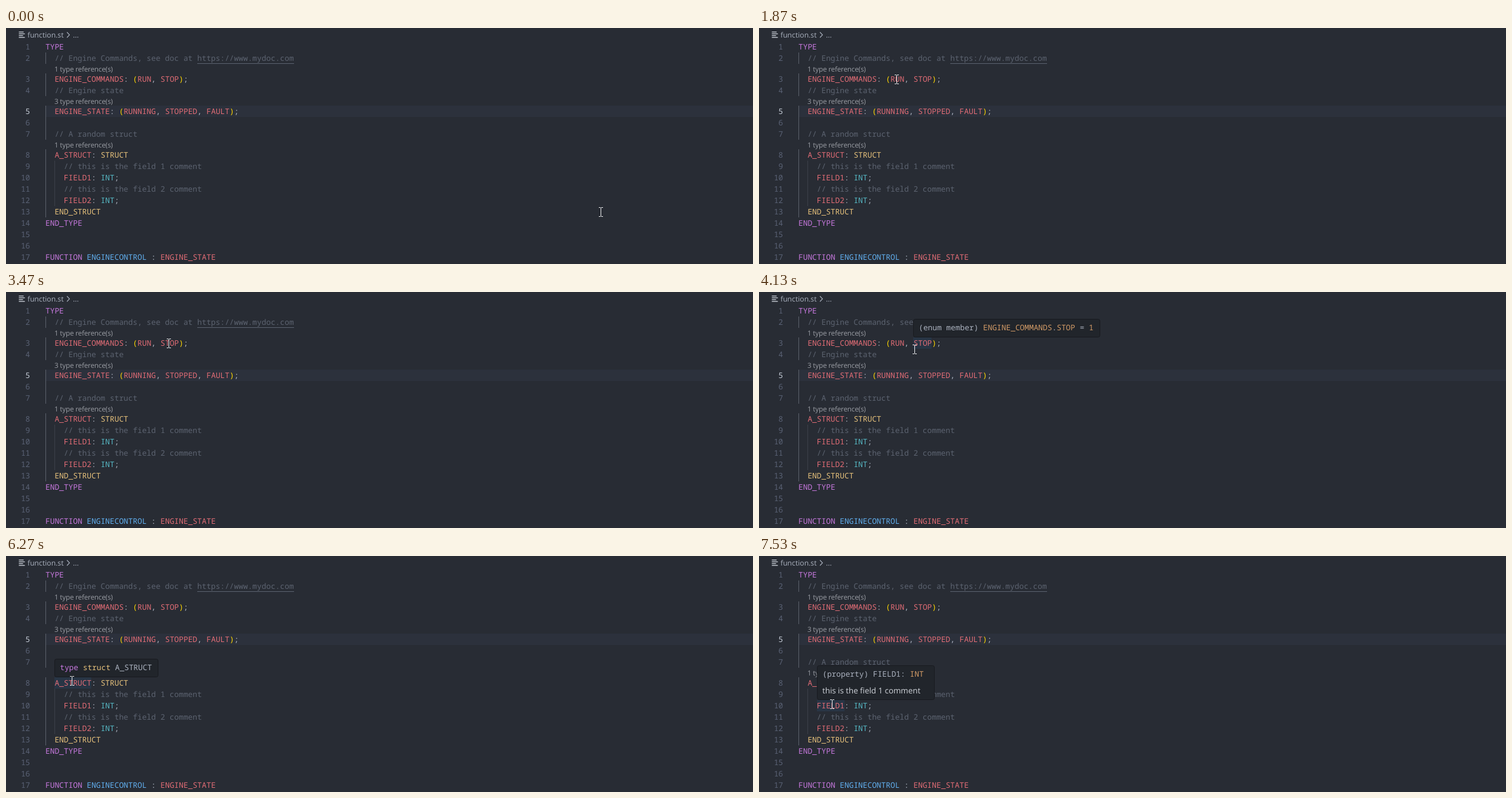
Write an HTML page that moves like this. It is 1250 px wide and 395 px high and loops after 8000 ms.

```html
<!DOCTYPE html>
<html lang="en">
<head>
<meta charset="utf-8">
<title>Hover hints</title>
<style>
  html, body { margin: 0; width: 100%; height: 100%; overflow: hidden; background: #282c34; }
  svg { display: block; width: 1250px; height: 395px; }
  text { white-space: pre; text-rendering: geometricPrecision; }
  .code { font: 12.8333px "Noto Sans Mono", monospace; }
  .ui { font-family: "Open Sans", "Noto Sans", sans-serif; }
</style>
</head>
<body>
<svg id="stage" viewBox="0 0 1250 395"></svg>
<script>
const CHAR = 7.7, LEFT = 66, FPS = 15, LOOP = 8000;
const COLORS = {
  P: '#c678dd', R: '#e06c75', Y: '#e5c07b', C: '#56b6c2', B: '#61afef',
  G: '#abb2bf', K: '#5c6370', O: '#d19a66', A: '#ffd700'
};

// Each row: text line with colour marks, or a lens label starting with '#'
const rows = [
  '{P}TYPE',
  '  {K}// Engine Commands, see doc at https://www.mydoc.com',
  '#1 type reference(s)',
  '  {R}ENGINE_COMMANDS{G}: {A}({R}RUN{G}, {R}STOP{A}){G};',
  '  {K}// Engine state',
  '#3 type reference(s)',
  '  {R}ENGINE_STATE{G}: {A}({R}RUNNING{G}, {R}STOPPED{G}, {R}FAULT{A}){G};',
  '',
  '  {K}// A random struct',
  '#1 type reference(s)',
  '  {R}A_STRUCT{G}: {Y}STRUCT',
  '    {K}// this is the field 1 comment',
  '    {R}FIELD1{G}: {C}INT{G};',
  '    {K}// this is the field 2 comment',
  '    {R}FIELD2{G}: {C}INT{G};',
  '  {Y}END_STRUCT',
  '{P}END_TYPE',
  '',
  '',
  '{P}FUNCTION {B}ENGINECONTROL{G} : {R}ENGINE_STATE'
];

// show/hide in ticks; fade = ticks until opaque; word = highlighted characters
const popups = [
  { show: 14, hide: 28, fade: 1, x: 81, y: 45, w: 212, word: 15,
    text: '{P}type {Y}enum{G} ENGINE_COMMANDS' },
  { show: 34, hide: 52, fade: 2, x: 220, y: 45, w: 305, word: 3,
    text: '{G}(enum member) {O}ENGINE_COMMANDS{G}.{O}RUN{G} = {O}0' },
  { show: 56, hide: 68, fade: 2, x: 258, y: 45, w: 313, word: 4,
    text: '{G}(enum member) {O}ENGINE_COMMANDS{G}.{O}STOP{G} = {O}1' },
  { show: 83, hide: 108, fade: 2, x: 81, y: 172, w: 174, word: 8,
    text: '{P}type {Y}struct{G} A_STRUCT' },
  { show: 111, hide: 120, fade: 2, x: 97, y: 183, w: 197, word: 6,
    text: '{G}(property) FIELD1: {O}INT', note: 'this is the field 1 comment' }
];

// Pointer path: tick, x, y
const path = [
  [0, 992, 300], [11, 156, 79], [17, 156, 79], [18, 156, 78], [21, 156, 78],
  [27, 227, 78], [42, 227, 78], [47, 269, 78], [61, 269, 78], [67, 108, 218],
  [71, 104, 199], [93, 104, 199], [94, 107, 201], [98, 127, 236],
  [100, 119, 240], [120, 119, 240]
];

const rect = (x, y, w, h, fill, more = '') =>
  `<rect x="${x}" y="${y}" width="${w}" height="${h}" fill="${fill}" ${more}/>`;

const label = (x, y, size, fill, s, gap = 0) =>
  `<text class="ui" x="${x}" y="${y}" font-size="${size}" letter-spacing="${gap}" fill="${fill}">${s}</text>`;

function code(x, y, marked) {
  const parts = marked.split(/\{(\w)\}/);
  let col = parts[0].length, out = '';
  for (let i = 1; i < parts.length; i += 2) {
    const slant = parts[i] === 'K' ? ' font-style="italic"' : '';
    out += `<text class="code" x="${x + col * CHAR}" y="${y}" fill="${COLORS[parts[i]]}"${slant}>${parts[i + 1]}</text>`;
    col += parts[i + 1].length;
  }
  return out;
}

function header() {
  const bars = [[6, 8], [9, 10], [12, 7], [15, 10]];
  return bars.map(([y, w]) => rect(21.5, y, w, 1.4, '#c3c8d0')).join('') +
    label(36, 15.8, 12.2, '#abb2bf', 'function.st') +
    '<path d="M102 7l4.3 4.5l-4.3 4.5" fill="none" stroke="#abb2bf" stroke-width="1.1"/>' +
    label(112, 15.8, 12.2, '#abb2bf', '...');
}

function guides() {
  const outer = [[41, 60], [76, 114], [130, 187], [203, 317]];
  return outer.map(([a, b]) => rect(66, a, 1, b - a, '#5c616c')).join('') +
    rect(81, 222, 1, 76, '#3c4049');
}

function editor() {
  let y = 22, n = 0, out = '';
  for (const row of rows) {
    if (row[0] === '#') {
      out += label(81, y + 13, 11.7, '#999ca3', row.slice(1), -0.18);
      y += 16;
      continue;
    }
    const num = String(++n);
    out += `<text class="code" x="${40.3 - num.length * CHAR}" y="${y + 14}" fill="${n === 5 ? '#c6ccd7' : '#5a6275'}">${num}</text>`;
    out += code(LEFT, y + 14, row);
    y += 19;
  }
  return out + rect(320, 59, 162, 1, COLORS.K);
}

const height = p => p.note ? 58 : 31;

const highlight = p =>
  rect(p.x, p.y + height(p), p.word * CHAR, 19, '#283545', 'class="mark"');

const popup = p => '<g class="popup">' +
  rect(p.x + .5, p.y + .5, p.w - 1, height(p) - 1, '#21252b', 'rx="3" stroke="#181a1f"') +
  code(p.x + 9.2, p.y + 19, p.text) +
  (p.note ? label(p.x + 9, p.y + 47, 13.33, '#d0d4da', p.note) : '') + '</g>';

const stage = document.getElementById('stage');
stage.innerHTML = rect(0, 0, 1250, 395, '#282c34') +
  rect(66, 130, 1184, 19, '#2c313c') +
  popups.map(highlight).join('') +
  header() + guides() + editor() +
  popups.map(popup).join('') +
  '<path id="beam" d="M0 .5h3M4 .5h3M3.5 1v14M0 15.5h3M4 15.5h3" fill="none" stroke="#eef0f2"/>';

const marks = stage.querySelectorAll('.mark');
const boxes = stage.querySelectorAll('.popup');
const beam = document.getElementById('beam');

function pointer(k) {
  const i = path.findIndex(p => p[0] > k);
  const [k0, x0, y0] = path[i - 1], [k1, x1, y1] = path[i];
  const u = (k - k0) / (k1 - k0), e = u * u * (3 - 2 * u);
  return [Math.round(x0 + (x1 - x0) * e), Math.round(y0 + (y1 - y0) * e)];
}

function draw(ms) {
  const k = Math.floor((ms % LOOP + 4) * FPS / 1000) % 120;
  popups.forEach((p, i) => {
    const on = k >= p.show && k < p.hide;
    marks[i].setAttribute('opacity', on ? 1 : 0);
    boxes[i].setAttribute('opacity', on ? Math.min(1, .15 + .85 * (k - p.show) / p.fade) : 0);
  });
  beam.setAttribute('transform', `translate(${pointer(k)})`);
}

const start = performance.now();
function tick() {
  draw(performance.now() - start);
  requestAnimationFrame(tick);
}
tick();
</script>
</body>
</html>
```
